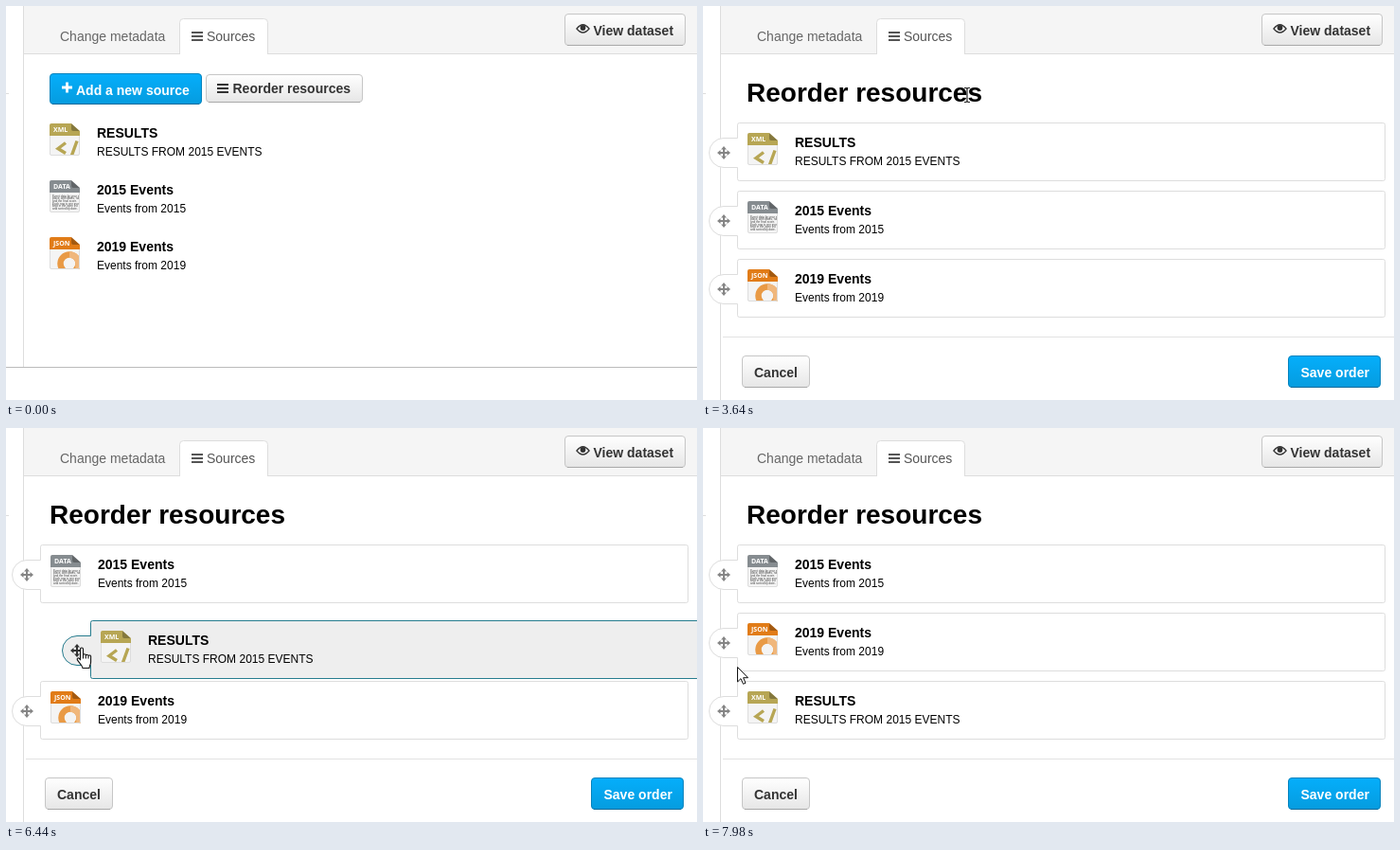
Animation of 730x416 px, one loop 8000 ms. Source, as an HTML page:

```html
<!DOCTYPE html>
<html lang="en">
<head>
<meta charset="utf-8">
<title>Reorder resources</title>
<style>
html, body { margin: 0; width: 100%; height: 100%; overflow: hidden; background: #fff; }
svg { display: block; width: 730px; height: 416px; font: 14px "Liberation Sans", Arial, sans-serif; }
.b { font-weight: bold; }
.sub { font-size: 12px; }
.label { font: bold 7px "Open Sans", sans-serif; fill: #fff; }
.tiny { font-size: 3.1px; fill: #444; }
</style>
</head>
<body>
<svg id="stage" viewBox="0 0 730 416">
  <defs>
    <linearGradient id="grey" x2="0" y2="1"><stop stop-color="#fff"/><stop offset="1" stop-color="#e6e6e6"/></linearGradient>
    <linearGradient id="blue" x2="0" y2="1"><stop stop-color="#05aefb"/><stop offset="1" stop-color="#059cdf"/></linearGradient>
    <clipPath id="page"><path d="M2 0H23L32 8V32a2 2 0 0 1-2 2H2a2 2 0 0 1-2-2V2a2 2 0 0 1 2-2Z"/></clipPath>
  </defs>
  <rect width="730" height="416" fill="#fff"/>
  <g id="base"></g>
  <g id="list"></g>
  <g id="order"></g>
  <g id="cursor"></g>
</svg>
<script>
const STEP = 140, LOOP = 8000, SWAP = 2800, GRAB = 6020, DROP = 7420;
const $ = id => document.getElementById(id);

const text = (x, y, s, cls = '', fill = '#000') =>
  `<text x="${x}" y="${y}" class="${cls}" fill="${fill}">${s}</text>`;
const rect = (x, y, w, h, fill, extra = '') =>
  `<rect x="${x}" y="${y}" width="${w}" height="${h}" fill="${fill}" ${extra}/>`;
const at = (x, y, s) => `<g transform="translate(${x} ${y})">${s}</g>`;
const bars = (x, y, fill) => [0, 4, 8].map(d => rect(x, y + d, 12, 2, fill)).join('');

function button(x, y, w, h, label, tx, ty, blue) {
  const edge = blue ? '#0683bd' : '#c6c6c6', foot = blue ? '#04699a' : '#a9a9a9';
  return rect(x + .5, y + .5, w - 1, h - 1, `url(#${blue ? 'blue' : 'grey'})`, `rx="3.5" stroke="${edge}"`) +
    `<path d="M${x + 3} ${y + h - .5}h${w - 6}" stroke="${foot}"/>` +
    text(tx, ty, label, 'b', blue ? '#fff' : '#333');
}

const items = [
  { tag: 'XML', color: '#b7a654', title: 'RESULTS', sub: 'RESULTS FROM 2015 EVENTS',
    art: '<path d="M17 20.5L9 26.5L17 31.5M29 18.5L23 35" fill="none" stroke="#b7a654" stroke-width="3.4"/>' },
  { tag: 'DATA', color: '#868c90', title: '2015 Events', sub: 'Events from 2015',
    art: ['Event data by year and', 'place, with dates, names', 'and the final score.', 'Each row is one event', 'kept in the open list', 'and sorted by date.']
      .map((s, i) => text(3, 17.5 + i * 2.7, s, 'tiny')).join('') },
  { tag: 'JSON', color: '#e17c18', title: '2019 Events', sub: 'Events from 2019',
    art: '<circle cx="21" cy="28" r="9.5" fill="none" stroke="#e99a45" stroke-width="6.5"/>' +
      '<path d="M21 18.5a9.5 9.5 0 0 1 9.5 9.5V36" fill="none" stroke="#f0b77c" stroke-width="6.5"/>' }
];

const icon = it => `<g clip-path="url(#page)">${rect(0, 0, 32, 34, '#f4f4f4')}${it.art}
  ${rect(0, 0, 32, 13, it.color)}<path d="M23 0V6a2 2 0 0 0 2 2H32Z" fill="#000" opacity=".28"/></g>
  <path d="M.5 13V32a1.5 1.5 0 0 0 1.5 1.5H30a1.5 1.5 0 0 0 1.5-1.5V13" fill="none" stroke="#ddd"/>
  ${text(4, 9, it.tag, 'label', '#fff')}`;
const item = it => icon(it) + text(50, 15, it.title, 'b') + text(50, 34, it.sub, 'sub');

// Four-way move arrows around 0,0
const move = '<path d="M-5 0H5M0 -5V5" stroke="currentColor" stroke-width="2"/>' +
  [0, 90, 180, 270].map(a => `<path d="M0 -7L3 -3.5H-3Z" fill="currentColor" transform="rotate(${a})"/>`).join('');

const row = it => `<g class="row"><path class="box" d="M2.5 .5H682.5a2 2 0 0 1 2 2V59.5a2 2 0 0 1-2 2H2.5a2 2 0 0 1-2-2V47.5H-14a15.5 15.5 0 0 1 0-31H.5V2.5a2 2 0 0 1 2-2Z"/>
  ${at(-14, 32, move)}${at(11, 11, item(it))}</g>`;

$('base').innerHTML =
  rect(19, 0, 711, 50, '#f5f5f5') + rect(19, 50, 711, 1, '#ddd') + rect(0, 92, 3, 1, '#ddd') +
  '<path d="M183.5 51V17.5a4 4 0 0 1 4-4H272.5a4 4 0 0 1 4 4V51" fill="#fff" stroke="#ddd"/>' +
  text(57, 37, 'Change metadata', '', '#666') + bars(196, 27, '#555') + text(212, 37, 'Sources', '', '#555') +
  button(590, 8, 128, 34, 'View dataset', 620.5, 31) +
  '<path d="M603 24q6.5 -8.5 13 0q-6.500 8 -13 0Z" fill="#fff" stroke="#333" stroke-width="1.4"/><circle cx="609.5" cy="23" r="2.9" fill="#333"/>';

$('list').innerHTML =
  rect(18, 0, 1, 381, '#ddd') + rect(0, 381, 730, 1, '#bbb') +
  button(46, 71, 161, 33, 'Add a new source', 74, 94, true) +
  '<path d="M59 86H70M64.5 80.500V91.500" stroke="#fff" stroke-width="2.8"/>' +
  button(211, 72, 166, 30, 'Reorder resources', 239.5, 92) + bars(223, 82, '#333') +
  items.map((it, i) => at(46, 124 + 60 * i, item(it))).join('');

$('order').innerHTML =
  rect(18, 0, 1, 416, '#ddd') + rect(21, 349, 709, 1, '#e2e2e2') +
  `<text x="46" y="101" class="b" font-size="28">Reorder resources</text>` +
  button(41, 369, 72, 34, 'Cancel', 54, 392) +
  button(618, 369, 98, 34, 'Save order', 631.5, 392, true) +
  [1, 2, 0].map(i => row(items[i])).join('');

const found = [...document.querySelectorAll('.row')];
const rows = [found[2], found[0], found[1]];

const shapes = {
  hand: '<path transform="translate(-6 -1)" d="M4.500 13.500V2.500a1.500 1.500 0 0 1 3 0V9a1.400 1.400 0 0 1 2.800 .3a1.400 1.400 0 0 1 2.700 .6a1.300 1.300 0 0 1 2.600 .8V16c0 3-1.600 4-1.600 6.500H7c0-2.500-3-4.500-5.600-8.600c-.9-1.600 1-2.600 2.100-1.400zM7.500 9v3.500M10.300 9.500v3M13 10v2.500" fill="#fff" stroke="#111" stroke-width="1.100"/>',
  arrow: '<path d="M.5 .5V16L4 12.600L6.500 18.300L9 17.200L6.600 11.700H11.500Z" fill="#fff" stroke="#111"/>',
  beam: '<path d="M-3 -7.500H-1L0 -6.500L1 -7.500H3M0 -6.500V6.500M-3 7.500H-1L0 6.500L1 7.500H3" fill="none" stroke="#222" stroke-width="1.200"/>'
};

// Keys are [time, x, y]
const path = [
  [1260, 432, 212], [1540, 380, 150], [1820, 332, 101], [2100, 313, 81], [2240, 313, 82],
  [3500, 313, 84], [3640, 279, 94], [3920, 205, 111], [4200, 117, 132], [4480, 48, 154], [4620, 34, 158],
  [5040, 32, 157], [5320, 27, 153], [5880, 27, 153]
];
const drag = [
  [5880, 0, 0], [6020, 10, 6], [6160, 30, 22], [6300, 46, 52], [6440, 53, 80],
  [6720, 55, 119], [7000, 56, 161], [7420, 56, 161]
];
const leave = [[7420, 85, 318], [7560, 85, 318], [7700, 70, 300], [7840, 46, 268], [7980, 36, 252]];

function along(keys, t) {
  let i = 0;
  while (i < keys.length - 2 && t > keys[i + 1][0]) i++;
  const a = keys[i], b = keys[i + 1];
  const k = Math.min(1, Math.max(0, (t - a[0]) / (b[0] - a[0])));
  return [a[1] + (b[1] - a[1]) * k, a[2] + (b[2] - a[2]) * k];
}

const inside = (p, x, y, w, h) => p[0] > x && p[0] < x + w && p[1] >= y && p[1] < y + h;

function draw(now) {
  const t = Math.floor(now % LOOP / STEP) * STEP;
  const open = t >= SWAP, held = t >= GRAB && t < DROP;
  const [dx, dy] = along(drag, t).map(Math.round);
  const pos = t >= DROP ? along(leave, t)
    : held ? [27 + dx, 152 + dy + (dy > 100 ? 4 : 0)] : along(path, t);

  const slot = t < GRAB ? 0 : t >= DROP || dy > 130 ? 2 : dy > 36 ? 1 : 0;
  const places = [slot, slot > 0 ? 0 : 1, slot > 1 ? 1 : 2];
  let grip = held;
  rows.forEach((el, i) => {
    const lifted = held && i === 0;
    const x = lifted ? 36 + dx : 36, y = lifted ? 123 + dy : 123 + 72 * places[i];
    const onGrip = inside(pos, 6, y + 16, 31, 32);
    const over = !held && open && (onGrip || inside(pos, 36, y, 685, 62));
    if (open && onGrip) grip = true;
    el.setAttribute('transform', `translate(${x} ${y})`);
    el.setAttribute('color', lifted ? '#333' : '#858585');
    const box = el.querySelector('.box');
    box.setAttribute('fill', lifted || over ? '#eee' : '#fff');
    box.setAttribute('stroke', lifted ? '#267c8e' : '#ddd');
  });

  const kind = !open ? (inside(pos, 211, 72, 166, 30) ? 'hand' : 'arrow')
    : grip ? 'hand' : inside(pos, 46, 74, 249, 36) ? 'beam' : 'arrow';
  $('list').style.display = open ? 'none' : '';
  $('order').style.display = open ? '' : 'none';
  $('cursor').innerHTML = t < 1260 ? '' : at(Math.round(pos[0]), Math.round(pos[1]), shapes[kind]);
}

let start;
function tick(now) {
  start ??= now;
  draw(now - start);
  requestAnimationFrame(tick);
}
draw(0);
requestAnimationFrame(tick);
</script>
</body>
</html>
```
